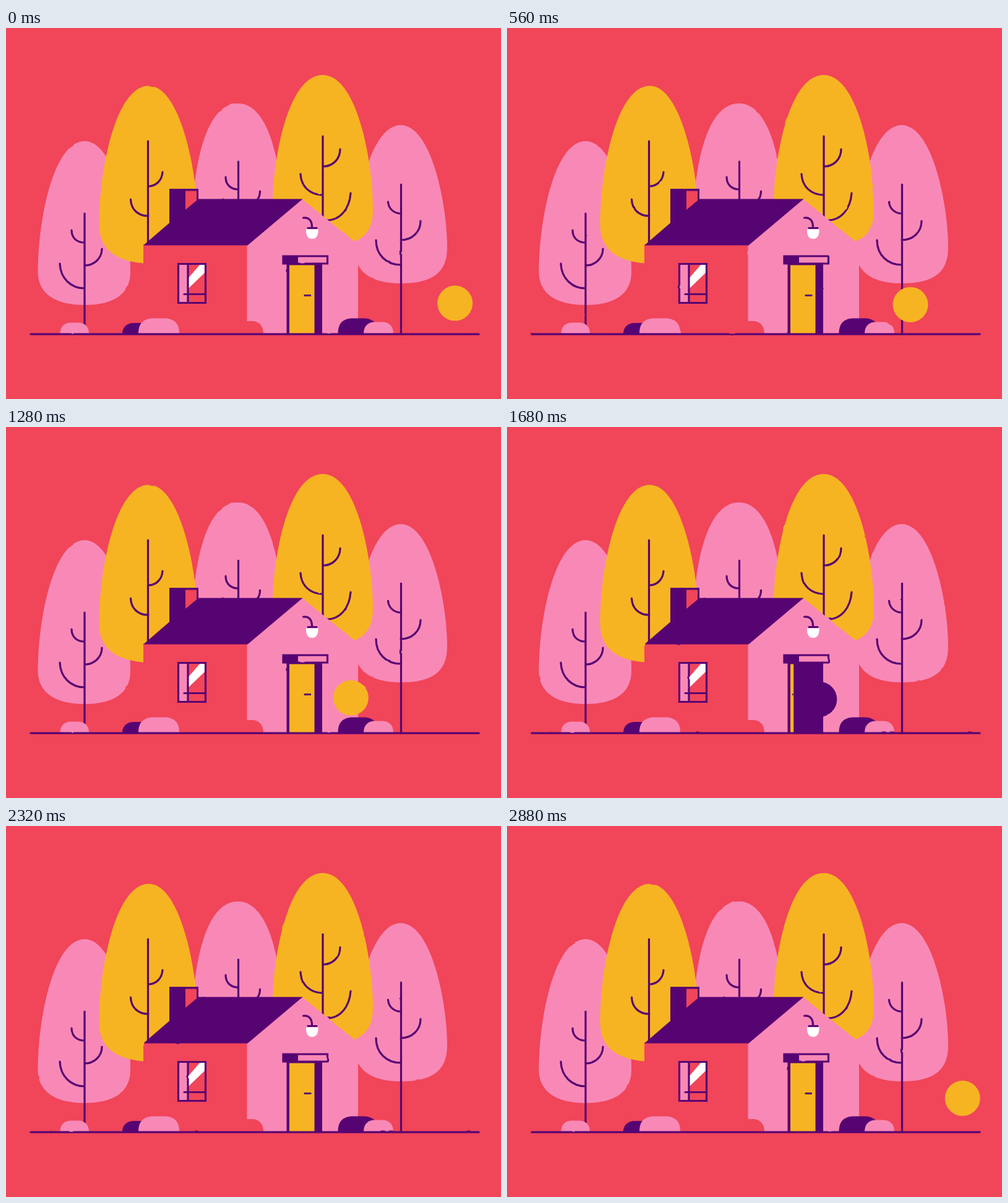
Write an HTML page that moves like this. It is 800 by 600 pixels and loops after 2.96 s.

```html
<!DOCTYPE html>
<html lang="en">
<head>
<meta charset="utf-8">
<title>House in the trees</title>
<style>
  html, body { margin: 0; width: 100%; height: 100%; overflow: hidden; background: #f14559; }
  svg { display: block; width: 100%; height: 100%; }
  .red { fill: #f14559; }
  .pink { fill: #f889b7; }
  .yellow { fill: #f6b422; }
  .dark { fill: #570473; }
  .white { fill: #fff; }
  .line { fill: none; stroke: #570473; stroke-width: 3.2; stroke-linecap: round; }
</style>
</head>
<body>
<svg viewBox="0 0 800 600">
  <defs>
    <filter id="rough" filterUnits="userSpaceOnUse" x="0" y="0" width="800" height="600" color-interpolation-filters="sRGB">
      <feTurbulence id="noise" type="fractalNoise" baseFrequency=".07" numOctaves="1" seed="1" result="n"/>
      <feDisplacementMap in="SourceGraphic" in2="n" scale="2" xChannelSelector="R" yChannelSelector="G"/>
    </filter>
    <clipPath id="walkway"><rect x="458" y="300" width="307" height="200"/></clipPath>
  </defs>

  <g filter="url(#rough)">
    <!-- trees -->
    <path class="pink" d="M127 183C77 183 51.500 309 51.500 395C52 430 80 448 127 448C174 448 201 430 201 395C201 309 176 183 127 183Z"/>
    <path class="pink" d="M375 122C328 122 303 201 299 330H449C446 201 420 122 375 122Z"/>
    <path class="pink" d="M638 157C588 157 563 284 563 355C563 395 590 413 638 413C690 413 713 395 713 355C713 284 687 157 638 157Z"/>
    <path class="yellow" d="M231 93.500C177 93.500 150.500 229 150.500 318C151 360 180 379 231 381C282 379 310 360 310 318C310 231 281 93.500 231 93.500Z"/>
    <path class="yellow" d="M512 76C456 76 430.500 209 430.500 300C431 350 470 362 512 360C530 358 550 351 563 345C582 338 593 322 593 295C593 209 566 76 512 76Z"/>

    <!-- trunks and branches -->
    <path class="line" d="M127 300V494M106 327C106 340 115 347 127 347M155 357C155 373 142 384 127 384M87 381C88 405 105 421 127 421"/>
    <path class="line" d="M229.500 183V352M253 233C252 247 242 256 230 256M201.500 277C202 293 213 304 230 304"/>
    <path class="line" d="M375.500 216V290M355 241C355 253 363 261 375 261M410.500 264C410.500 270 409 275 405 279"/>
    <path class="line" d="M512 175V315M540 196C540 212 528 224 512 224M476 236C477 257 492 270 512 270M557 267C555 293 540 311 518 311"/>
    <path class="line" d="M638.500 253V495M617.500 281C618 292 627 300 638 300M670 312C670 330 656 343 638 343M598 343C598 367 615 383 638 383"/>

    <!-- house -->
    <path class="red" d="M222 350H392V494H222Z"/>
    <path class="pink" d="M389.500 350L479 277L569 350V494H389.500Z"/>
    <path class="dark" d="M264 260H311V280L264 320Z"/>
    <path class="dark" d="M222 351.500L309 276.500H479.500L390.500 351.500Z"/>
    <path class="red" d="M290 263.500H308V279L290 294Z"/>
    <path class="red" d="M386 474H398C409 474 416 482 416 494H386Z"/>

    <!-- window -->
    <path class="pink" d="M279 382H293V444H279Z"/>
    <path class="white" d="M295 421V404L314 382H322V395Z"/>
    <path class="line" d="M278.500 381.500H322.500V444.500H278.500ZM294 382V444M288 430.500H322"/>

    <!-- lamp -->
    <path class="line" d="M480.500 307C490 306 494.500 312 494.500 322M488 323.500H502"/>
    <path class="white" d="M485 325.500H504.500C505 335 502 341 494.500 341C487.500 341 484.500 335 485 325.500Z"/>

    <g id="bushes"></g>
    <path class="line" d="M40 495.200H764"/>

    <path class="dark" d="M453.500 380H511V495H453.500Z"/>
    <g clip-path="url(#walkway)"><circle id="walker" r="28.5"/></g>
    <g id="door">
      <path class="yellow" d="M458 383.500H498.500V493.500H458Z"/>
      <path class="line" d="M483 432.500H492"/>
    </g>
    <path class="pink" d="M448 369H519V381H448Z"/>
    <path class="dark" d="M448 369H472V381H448Z"/>
    <path class="line" d="M448 369H519.500V381H448Z"/>
  </g>
</svg>
<script>
  const LOOP = 2960, STEP = 80;
  const $ = id => document.getElementById(id);
  const clamp01 = v => Math.min(1, Math.max(0, v));
  const ease = (t, from, to) => {
    const p = clamp01((t - from) / (to - from));
    return p * p * (3 - 2 * p);
  };

  const bush = (color, x, w, top) => {
    const r = x + w;
    return `<path class="${color}" d="M${x} 494C${x} ${top + 7} ${x + w * .14} ${top} ${x + w * .38} ${top}` +
      `H${r - w * .38}C${r - w * .14} ${top} ${r} ${top + 7} ${r} 494Z"/>`;
  };
  $('bushes').innerHTML =
    bush('pink', 87.5, 46.5, 476.5) +
    bush('dark', 188, 50, 477) +
    bush('pink', 214, 66, 469.5) +
    bush('dark', 536.5, 65, 469.5) +
    bush('pink', 578, 48, 475.5);

  function draw(t) {
    // the walk starts again off the right edge while the door closes
    const u = t >= 2320 ? t - LOOP : t;
    const bob = 1 - Math.cos((u - 320) / 480 * 2 * Math.PI);
    const walker = $('walker');
    walker.setAttribute('cx', 725.7 - .1315 * u);
    walker.setAttribute('cy', 438 + 4.7 * bob);
    walker.setAttribute('class', u >= 1600 ? 'dark' : 'yellow');

    const open = ease(t, 1300, 1560) - ease(t, 1960, 2240);
    $('door').setAttribute('transform', `translate(458 0) scale(${1 - .87 * open} 1) translate(-458 0)`);
    $('noise').setAttribute('seed', 1 + t / STEP % 4);
  }

  const start = performance.now();
  let shown = -1;
  function tick() {
    const t = Math.floor((performance.now() - start) % LOOP / STEP) * STEP;
    if (t !== shown) draw(shown = t);
    requestAnimationFrame(tick);
  }
  tick();
</script>
</body>
</html>
```
